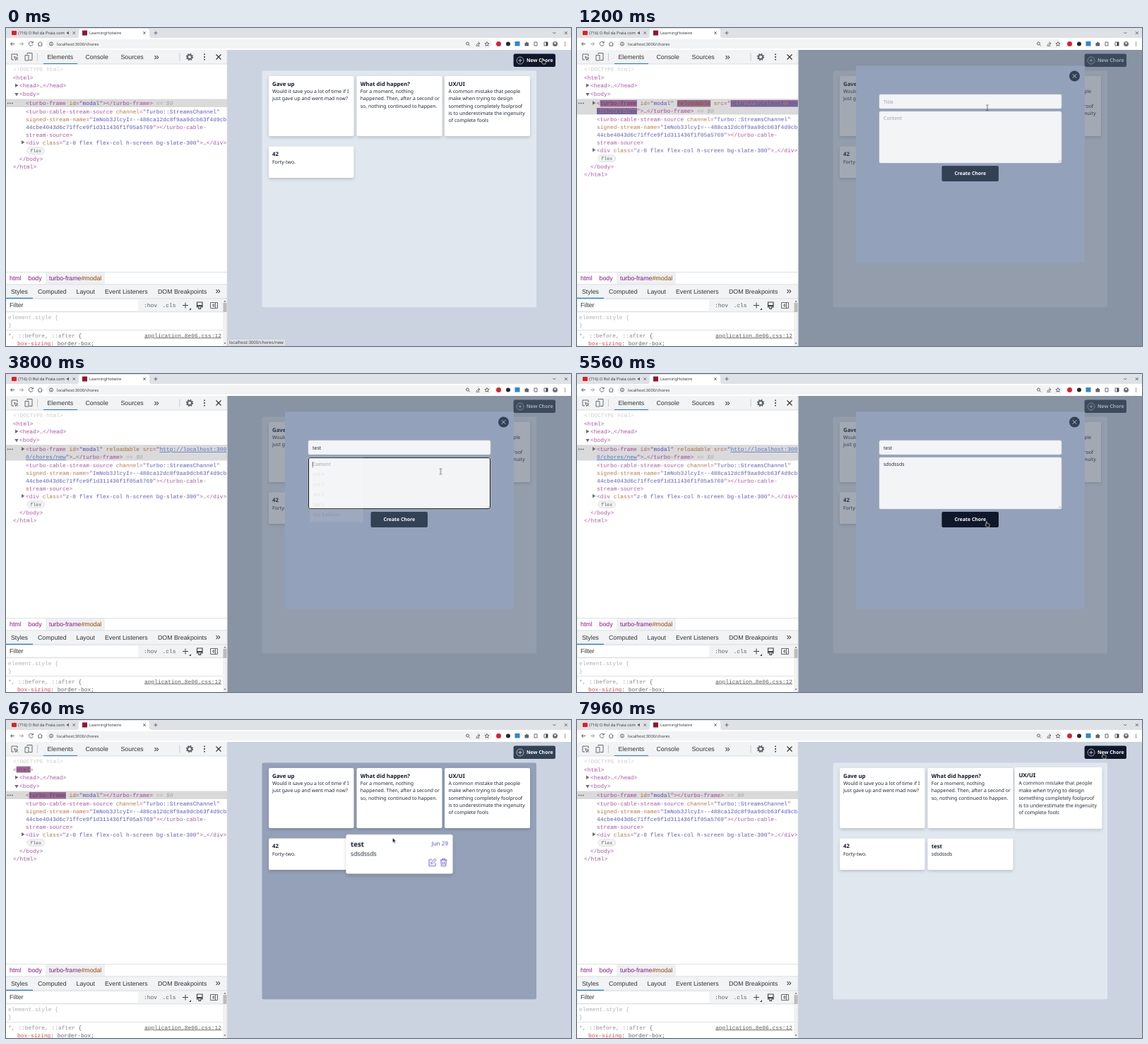
Recreate the animation shown at these times as an HTML page. Size 800 by 450 pixels, loop 8 s.

```html
<!DOCTYPE html>
<html lang="en">
<head>
<meta charset="utf-8">
<title>Chores</title>
<style>
html, body { margin: 0; width: 100%; height: 100%; overflow: hidden; background: #fff; }
svg { display: block; text-rendering: geometricPrecision; }
text { font-family: "Noto Sans", sans-serif; font-size: 6.95px; fill: #1e293b; }
.ui { font-family: "Liberation Sans", Arial, sans-serif; font-size: 8.8px; fill: #333; }
.mono text { font-family: "Liberation Mono", monospace; font-size: 7.9px; fill: #881280; white-space: pre; opacity: .72; }
.mono .a { fill: #994500; }
.mono .v { fill: #1a1aa6; }
.mono .v.link { fill: #1a4fc8; }
.mono .g { fill: #949494; }
.mono .k { fill: #222; }
.link { text-decoration: underline; }
.bar text { font-size: 5.75px; fill: #3c4043; }
.ic { fill: none; stroke: #5f6368; stroke-width: .95; }
.title { font-size: 7.8px; font-weight: 600; fill: #0f172a; }
.btn { font-size: 6.9px; font-weight: 600; fill: #fff; }
.hint { fill: #9ca3af; }
.menu text { font-size: 6.4px; fill: #222; }
.card rect { fill: #fff; filter: drop-shadow(0 2px 2px #0000002b); }
.field { fill: #f3f4f6; stroke: #d1d5db; stroke-width: .5; }
.ring { fill: none; stroke: #181818; stroke-width: 1; }

/* One loop is 8 s, so 1% is 80 ms. */
.anim { animation: 8s step-end infinite; }
.modal { animation-name: modal; }
.closed { animation-name: closed; }
.open { animation-name: open; }
.fold { animation-name: fold; }
.shift { animation-name: shift; }
.flash1 { animation-name: flash1; animation-timing-function: linear; }
.flash2 { animation-name: flash2; animation-timing-function: linear; }
.status { animation-name: status; }
.board { animation-name: board; }
.new { animation-name: new; }
.create { animation-name: create; }
.ring1 { animation-name: ring1; }
.ring2 { animation-name: ring2; }
.hint1 { animation-name: hint1; }
.hint2 { animation-name: hint2; }
.caret { animation-name: caret; }
.menu { animation-name: menu; transform-origin: 468px 163px; }
.added { animation-name: added; }
.grow { animation-timing-function: cubic-bezier(.4, 0, .2, 1); }
.grow.c2 { animation-name: grow2; transform-origin: 557px 110.5px; }
.grow.c3 { animation-name: grow3; transform-origin: 681.5px 110.5px; }
.grow.c5 { animation-name: grow5; transform-origin: 557px 189.8px; }
.tools { opacity: 0; }
.c2 .tools { animation-name: tools2; }
.c3 .tools { animation-name: tools3; }
.c5 .tools { animation-name: tools5; }
.pointer { animation-name: pointer; animation-timing-function: ease-in-out; }
.hand { animation-name: hand; }
.arrow { animation-name: arrow; }
.beam { animation-name: beam; }
.key { fill-opacity: 0; animation: key 8s var(--t) step-end infinite; }

@keyframes key { 0% { fill-opacity: 1 } 43.75%, 100% { fill-opacity: 0 } }
@keyframes modal { 0% { opacity: 0 } 9% { opacity: 1 } 72%, 100% { opacity: 0 } }
@keyframes open { 0% { opacity: 0 } 10% { opacity: 1 } 72%, 100% { opacity: 0 } }
@keyframes closed { 0% { opacity: 1 } 10% { opacity: 0 } 72%, 100% { opacity: 1 } }
@keyframes fold { 0% { opacity: 0 } 11.5% { opacity: 1 } 72%, 100% { opacity: 0 } }
@keyframes shift { 0% { transform: none } 10% { transform: translateY(10.8px) } 72%, 100% { transform: none } }
@keyframes flash1 { 0%, 9.99% { opacity: 0 } 10%, 12.5% { opacity: 1 } 15% { opacity: .87 } 28%, 100% { opacity: 0 } }
@keyframes flash2 { 0%, 80.99% { opacity: 0 } 81%, 82% { opacity: 1 } 84.5% { opacity: .87 } 93.5%, 100% { opacity: 0 } }
@keyframes status { 0% { opacity: 1 } 12%, 100% { opacity: 0 } }
@keyframes board { 0% { fill: #e0e7ef } 72% { fill: #94a1b8 } 98.5%, 100% { fill: #e0e7ef } }
@keyframes new { 0% { fill: #0f172a } 9% { fill: #334155 } 98.5%, 100% { fill: #0f172a } }
@keyframes create { 0% { fill: #334155 } 67.25%, 100% { fill: #0f172a } }
@keyframes ring1 { 0% { opacity: 0 } 21.25% { opacity: 1 } 46.25%, 100% { opacity: 0 } }
@keyframes ring2 { 0% { opacity: 0 } 46.25% { opacity: 1 } 68.5%, 100% { opacity: 0 } }
@keyframes hint1 { 0% { opacity: 1 } 28.75%, 100% { opacity: 0 } }
@keyframes hint2 { 0% { opacity: 1 } 52.5%, 100% { opacity: 0 } }
@keyframes caret {
  0% { opacity: 0 }
  21.25% { opacity: 1; transform: none }
  28.75% { transform: translate(2.5px, 0) }
  32.5% { transform: translate(6.4px, 0) }
  35.5% { transform: translate(9.8px, 0) }
  38.5% { transform: translate(12.3px, 0) }
  46.25% { transform: translate(0, 23.5px) }
  52.5% { transform: translate(3.3px, 23.5px) }
  53.75% { transform: translate(7.6px, 23.5px) }
  55% { transform: translate(10.9px, 23.5px) }
  56.25% { transform: translate(15.2px, 23.5px) }
  57.5% { transform: translate(18.5px, 23.5px) }
  58.75% { transform: translate(21.9px, 23.5px) }
  60% { transform: translate(26.1px, 23.5px) }
  61.25% { opacity: 1; transform: translate(29.5px, 23.5px) }
  68.5%, 100% { opacity: 0 }
}
@keyframes menu {
  0% { opacity: 0 }
  30% { opacity: 1; transform: none }
  46.25% { opacity: 1; transform: none; animation-timing-function: linear }
  47.5% { opacity: .1; transform: scale(.95); animation-timing-function: linear }
  48%, 100% { opacity: 0; transform: scale(.95) }
}
@keyframes added { 0% { opacity: 0 } 73%, 100% { opacity: 1 } }
@keyframes grow5 { 0%, 73.25% { transform: none } 75.25%, 87.5% { transform: scale(1.25) } 89.4%, 100% { transform: none } }
@keyframes grow2 { 0%, 88.75% { transform: none } 90.6%, 92.9% { transform: scale(1.25) } 94.8%, 100% { transform: none } }
@keyframes grow3 { 0%, 92.9% { transform: none } 94.8%, 98.6% { transform: scale(1.25) } 100% { transform: none } }
@keyframes tools5 { 0% { opacity: 0 } 73.25% { opacity: 1 } 87.5%, 100% { opacity: 0 } }
@keyframes tools2 { 0% { opacity: 0 } 88.75% { opacity: 1 } 92.9%, 100% { opacity: 0 } }
@keyframes tools3 { 0% { opacity: 0 } 92.9% { opacity: 1 } 98.5%, 100% { opacity: 0 } }
@keyframes pointer {
  0%, 11% { transform: translate(760px, 43px) }
  14.4%, 18.75% { transform: translate(581px, 113px) }
  21.25%, 41.5% { transform: translate(579px, 110px) }
  45.5%, 62.5% { transform: translate(615.5px, 138px) }
  67.5%, 72.5% { transform: translate(580px, 208.5px) }
  82.5% { transform: translate(547.5px, 166.8px) }
  85.5% { transform: translate(547.5px, 166.8px); animation-timing-function: cubic-bezier(.4, 0, .8, .8) }
  98.5% { transform: translate(741px, 54px); animation-timing-function: linear }
  99.5%, 100% { transform: translate(745px, 46.5px) }
}
@keyframes hand { 0% { opacity: 1 } 9% { opacity: 0 } 67.25% { opacity: 1 } 72% { opacity: 0 } 98.5%, 100% { opacity: 1 } }
@keyframes arrow { 0% { opacity: 0 } 9% { opacity: 1 } 14% { opacity: 0 } 72% { opacity: 1 } 98.5%, 100% { opacity: 0 } }
@keyframes beam { 0% { opacity: 0 } 14% { opacity: 1 } 67.25%, 100% { opacity: 0 } }
</style>
</head>
<body>
<svg width="800" height="450" viewBox="0 0 800 450">
<defs>
  <g id="date"><text text-anchor="end" style="font-size:6.4px;fill:#5146d0">Jun 29</text></g>
  <g id="edit" fill="none" stroke="#5b50d6" stroke-width=".75" stroke-linejoin="round">
    <path d="M0-3.2h-3.6v7.2h7.2V.5M-1.4 1.6l.3-1.8L3-4.2l1.4 1.4L.4 1.3z"/>
    <path d="M9-2.8h7.6M11.3-2.8v-1.3h3v1.3M9.8-2.8l.5 6.8h5l.5-6.8M11.8-1v3.4M13.8-1v3.4"/>
  </g>
</defs>

<!-- Browser bar -->
<g class="bar">
  <rect width="800" height="14" fill="#dee1e6"/>
  <path d="M100 14q3 0 3-3V4q0-3 3-3h94q3 0 3 3v7q0 3 3 3z" fill="#fff"/>
  <rect x="8" y="4" width="7" height="6" rx="1" fill="#e02020"/>
  <text x="17" y="9.2">(716) O Rol da Praia com</text>
  <path class="ic" d="M94.5 5.2l3.6 3.6m0-3.6l-3.6 3.6M194.2 5.2l3.6 3.6m0-3.6l-3.6 3.6M209.5 7h5M212 4.5v5M774.3 6l2 2 2-2M790.8 5l4 4m0-4l-4 4"/>
  <path d="M86 6h1.3l1.7-1.5v5L87.3 8H86z" fill="#5f6368"/>
  <rect x="108" y="3.5" width="7" height="7" fill="#94152f"/>
  <text x="118" y="9.2">LearningHotwire</text>

  <rect y="14" width="800" height="17" fill="#fff"/>
  <rect x="57" y="16" width="631" height="13" rx="6.5" fill="#f1f3f4"/>
  <path class="ic" d="M12 22.5H6.5m2.5-2.5l-2.5 2.5 2.5 2.5M38 20.8a3 3 0 1 0 .2 2.4M38.3 18.8v2.3H36M45 22.5l3.3-3 3.3 3M46 22v3.3h4.6V22"/>
  <path class="ic" d="M19 22.5h5.5m-2.5-2.5l2.5 2.5-2.5 2.5" opacity=".6"/>
  <circle class="ic" cx="64" cy="22.5" r="2.5"/><path class="ic" d="M64 22v2M64 20.7v.7"/>
  <text x="72" y="24.7">localhost:3000/chores</text>
  <g class="ic">
    <circle cx="653.5" cy="22" r="2"/><path d="M655 23.5l2 2M668.5 19.5l2.5 2.3-2.5 2.3M670.5 21.8q-4 0-4.5 2.5M665.5 25.3h5"/>
    <path d="M681 19.5l.9 2 2.2.2-1.7 1.4.5 2.2-1.9-1.1-1.9 1.1.5-2.2-1.7-1.4 2.2-.2z"/>
    <path d="M748 20h4v5h-4zM762 20h5v5h-5z"/>
  </g>
  <circle cx="697.5" cy="22.5" r="3.5" fill="#d92332"/>
  <circle cx="711" cy="22.5" r="3" fill="#26282b"/>
  <rect x="720.5" y="19" width="7" height="6.5" fill="#2f86d6"/>
  <path d="M734.5 21h1.7q0-1.6 1.2-1.6t1.2 1.6h1.5v4.5h-5.6z" fill="#5f6368"/>
  <path d="M764.5 20h2.5v5h-2.5z" fill="#3c4043"/>
  <circle cx="777.5" cy="22.5" r="3.5" fill="#6b7075"/><circle cx="777.5" cy="21.5" r="1.2" fill="#fff"/>
  <path d="M791.5 19.8v1.2m0 1v1.2m0 1v1.2" stroke="#5f6368" stroke-width="1.2"/>
</g>

<!-- Developer tools -->
<rect y="31" width="313" height="419" fill="#fff"/>
<rect y="31" width="313" height="20" fill="#f1f3f4"/>
<path d="M0 51h313M0 345.5h313" stroke="#cacdd1" stroke-width=".6"/>
<path d="M53 50.5h48" stroke="#1a73e8" stroke-width="1.2"/>
<g class="ic">
  <path d="M11 45H8v-8h8v3M11.5 40.5l5.5 2-2.3.9-.9 2.3zM14.8 43.4l2.2 2.3"/>
  <path d="M30 37v-1.5h7v10h-4M27 38.5h5v7.5h-5z"/><path d="M44.5 35.5v11M246 35.5v11" stroke="#c4c7ca"/>
  <circle cx="260" cy="41" r="3" stroke-width="2"/><circle cx="260" cy="41" r="4.5" stroke-width="1.4" stroke-dasharray="1.77"/>
  <path d="M297.5 37.5l7 7m0-7l-7 7" stroke="#333" stroke-width="1.2"/>
</g>
<path d="M281 36.5v1.8m0 1.8v1.8m0 1.8v1.8" stroke="#444" stroke-width="1.7"/>
<text class="ui" x="58.5" y="44">Elements</text><text class="ui" x="112.5" y="44">Console</text>
<text class="ui" x="162.5" y="44">Sources</text><text class="ui" x="209.5" y="44.5" style="font-size:13px">»</text>

<g class="mono">
  <rect y="100.5" width="313" height="11.5" fill="#dadada"/>
  <rect class="anim open" y="100.5" width="313" height="22" fill="#dadada"/>
  <g fill="#875a82">
    <path class="anim flash1" d="M32.7 102h52.2v9.5H32.7zM141.8 102h47.4v9.5h-47.4zM217.6 102H313v9.5h-95.4zM28 113h57v9H28z"/>
    <path class="anim flash2" d="M14.7 65.5h20v9h-20zM32.7 102h52.2v9.5H32.7z"/>
  </g>
  <path d="M2 106.5h1.5m1.5 0h1.5m1.5 0h1.5" stroke="#555" stroke-width="1.4"/>
  <path d="M13 78.5l4.5 2.7-4.5 2.7zM12.3 92h5.4L15 96.5z" fill="#6e6e6e"/>
  <text x="10" y="61" style="fill:#bbb">&lt;!DOCTYPE html&gt;</text>
  <text x="10" y="72.6">&lt;html&gt;</text>
  <text x="19" y="84">&lt;head&gt;<tspan class="k">…</tspan>&lt;/head&gt;</text>
  <text x="19" y="96.4">&lt;body&gt;</text>
  <g class="anim closed">
    <text x="28" y="109">&lt;turbo-frame <tspan class="a">id</tspan>="<tspan class="v">modal</tspan>"&gt;&lt;/turbo-frame&gt;<tspan class="g" font-style="italic"> == $0</tspan></text>
  </g>
  <g class="anim open">
    <path class="anim fold" d="M22 103.3l4.5 2.7-4.5 2.7z" fill="#6e6e6e"/>
    <text x="28" y="109">&lt;turbo-frame <tspan class="a">id</tspan>="<tspan class="v">modal</tspan>" <tspan class="a">reloadable</tspan> <tspan class="a">src</tspan>="<tspan class="v link">http://localhost:300</tspan></text>
    <text x="28" y="120.2"><tspan class="v link">0/chores/new</tspan>"&gt;<tspan class="k">…</tspan>&lt;/turbo-frame&gt;<tspan class="g" font-style="italic"> == $0</tspan></text>
  </g>
  <g class="anim shift">
    <text x="28" y="120.6">&lt;turbo-cable-stream-source <tspan class="a">channel</tspan>="<tspan class="v">Turbo::StreamsChannel</tspan>"</text>
    <text x="28" y="131.6"><tspan class="a">signed-stream-name</tspan>="<tspan class="v">ImNob3JlcyI=--488ca12dc8f9aa9dcb63f4d9cb</tspan></text>
    <text x="28" y="142.6"><tspan class="v">44cbe4043d6c71ffce9f1d311436f1f05a5769</tspan>"&gt;&lt;/turbo-cable-</text>
    <text x="28" y="153.5">stream-source&gt;</text>
    <path d="M22 159l4.5 2.7-4.5 2.7z" fill="#6e6e6e"/>
    <text x="28" y="164.7">&lt;div <tspan class="a">class</tspan>="<tspan class="v">z-0 flex flex-col h-screen bg-slate-300</tspan>"&gt;<tspan class="k">…</tspan>&lt;/div&gt;</text>
    <rect x="30" y="169" width="24.5" height="9.5" rx="4.7" fill="#f1f3f4" stroke="#cacdd1" stroke-width=".6"/>
    <text class="k" x="42.2" y="175.8" text-anchor="middle" style="font-size:6.6px">flex</text>
    <text x="19" y="187.5">&lt;/body&gt;</text>
    <text x="10" y="199">&lt;/html&gt;</text>
  </g>
</g>

<rect x="56" y="346" width="84" height="16.5" fill="#eef0f2"/>
<text class="ui" x="5" y="357" style="fill:#881280">html</text>
<text class="ui" x="31.5" y="357" style="fill:#881280">body</text>
<text class="ui" x="61" y="357" style="fill:#881280">turbo-frame<tspan fill="#994500">#modal</tspan></text>
<rect y="363" width="313" height="39" fill="#f1f3f4"/>
<path d="M0 362.8h313M0 382.8h313M0 401.8h307M0 427.5h307" stroke="#cacdd1" stroke-width=".6"/>
<path d="M0 382.3h38" stroke="#1a73e8" stroke-width="1.2"/>
<text class="ui" x="7" y="375.5">Styles</text><text class="ui" x="45" y="375.5">Computed</text>
<text class="ui" x="99.5" y="375.5">Layout</text><text class="ui" x="140" y="375.5">Event Listeners</text>
<text class="ui" x="215" y="375.5">DOM Breakpoints</text><text class="ui" x="296.5" y="376" style="font-size:13px">»</text>
<rect x="1" y="384.5" width="186" height="15.5" fill="#fff"/>
<text class="ui" x="5" y="395.3">Filter</text>
<g class="mono">
  <text class="k" x="195" y="395">:hov</text><text class="k" x="221.5" y="395">.cls</text>
  <text class="g" x="3" y="411.5">element.style {</text><text class="g" x="3" y="423">}</text>
  <text class="k" x="3" y="437.5"><tspan fill="#666">*, ::before, ::after</tspan> {</text>
  <text class="k link" x="196" y="437.5">application…8e06.css:12</text>
  <text class="k" x="16" y="449"><tspan fill="#c80000">box-sizing</tspan>: border-box;</text>
</g>
<path d="M250 392.5h8m-4-4v8" stroke="#444"/><path d="M262 396v3h-3z" fill="#444"/>
<path d="M270.5 388h7.5v4.5h-7.5zM270.5 393.5h7.5v1.5h-2.5v2.5H273V395h-2.5z" fill="none" stroke="#444" stroke-width="1.2"/>
<path d="M289.5 388.5h10v8h-10zM296.5 388.5v8M294.5 390.5l-2.5 2 2.5 2z" class="ic"/>
<rect x="307" y="384" width="6" height="66" fill="#f1f1f1"/>
<rect x="307.5" y="389" width="5" height="13" fill="#bcbcbc"/>
<path d="M308.5 387.5l1.5-1.8 1.5 1.8zM308.5 445.5l1.5 1.8 1.5-1.8z" fill="#555"/>
<path d="M313.3 31v419" stroke="#b5b9be" stroke-width=".7"/>

<!-- Page -->
<rect x="313.7" y="31" width="486.3" height="419" fill="#cbd3e0"/>
<rect class="anim new" x="718.6" y="36.5" width="59.4" height="18.6" rx="2.5"/>
<circle cx="728" cy="46" r="5" fill="none" stroke="#fff" stroke-width=".6"/>
<path d="M725.3 46h5.4M728 43.3v5.4" stroke="#fff" stroke-width=".7"/>
<text class="btn" x="737" y="48.3">New Chore</text>
<rect class="anim board" x="362.5" y="60.6" width="388.5" height="334.6" rx="2.5"/>

<g class="card">
  <rect x="372" y="68" width="120.5" height="85" rx="2"/>
  <text class="title" x="377" y="81.8">Gave up</text>
  <text x="377" y="92">Would it save you a lot of time if I</text><text x="377" y="102.3">just gave up and went mad now?</text>
</g>
<g class="card anim grow c2">
  <rect x="496.5" y="68" width="121" height="85" rx="2"/>
  <text class="title" x="501.8" y="81.8">What did happen?</text>
  <text x="501.8" y="92">For a moment, nothing</text><text x="501.8" y="102.3">happened. Then, after a second or</text>
  <text x="501.8" y="112.6">so, nothing continued to happen.</text>
  <g class="anim tools"><use href="#date" x="612.2" y="80"/><use href="#edit" x="594.3" y="140.2"/></g>
</g>
<g class="card anim grow c3">
  <rect x="621" y="68" width="121" height="85" rx="2"/>
  <text class="title" x="626.5" y="81.8">UX/UI</text>
  <text x="626.5" y="92">A common mistake that people</text><text x="626.5" y="102.3">make when trying to design</text>
  <text x="626.5" y="112.6">something completely foolproof</text><text x="626.5" y="122.9">is to underestimate the ingenuity</text>
  <text x="626.5" y="133.1">of complete fools</text>
  <g class="anim tools"><use href="#date" x="737" y="80"/><use href="#edit" x="719" y="140.2"/></g>
</g>
<g class="card">
  <rect x="372" y="167.5" width="120.5" height="44.5" rx="2"/>
  <text class="title" x="377" y="181.3">42</text><text x="377" y="191.5">Forty-two.</text>
</g>
<g class="anim added"><g class="card anim grow c5">
  <rect x="496.5" y="167.5" width="121" height="44.5" rx="2"/>
  <text class="title" x="501.8" y="181.3">test</text><text x="501.8" y="191.5">sdsdssds</text>
  <g class="anim tools"><use href="#date" x="612.2" y="179.8"/><use href="#edit" x="594.3" y="199.2"/></g>
</g></g>

<!-- Dialog -->
<g class="anim modal">
  <rect x="313.7" y="31" width="486.3" height="419" fill="#475569" opacity=".5"/>
  <rect x="395" y="53.5" width="324" height="279" fill="#94a1ba"/>
  <circle cx="704.5" cy="68" r="7.5" fill="#334155"/>
  <path d="M701.7 65.2l5.6 5.6m0-5.6l-5.6 5.6" stroke="#e2e8f0" stroke-width=".8"/>
  <rect class="field" x="428" y="94" width="258" height="20" rx="2"/>
  <rect class="field" x="428" y="118" width="258" height="73" rx="2"/>
  <path d="M682 189.5l2.5-2.5M683.5 189.7l1.2-1.2" stroke="#777" stroke-width=".5"/>
  <text class="hint anim hint1" x="434" y="106.5">Title</text>
  <text class="hint anim hint2" x="434" y="130">Content</text>
  <text x="434" y="106.5"><tspan class="key" style="--t:2.3s">t</tspan><tspan class="key" style="--t:2.6s">e</tspan><tspan class="key" style="--t:2.84s">s</tspan><tspan class="key" style="--t:3.08s">t</tspan></text>
  <text x="434" y="130"><tspan class="key" style="--t:4.2s">s</tspan><tspan class="key" style="--t:4.3s">d</tspan><tspan class="key" style="--t:4.4s">s</tspan><tspan class="key" style="--t:4.5s">d</tspan><tspan class="key" style="--t:4.6s">s</tspan><tspan class="key" style="--t:4.7s">s</tspan><tspan class="key" style="--t:4.8s">d</tspan><tspan class="key" style="--t:4.9s">s</tspan></text>
  <rect class="ring anim ring1" x="428.5" y="94.5" width="257" height="19" rx="2"/>
  <rect class="ring anim ring2" x="428.5" y="118.6" width="257" height="72" rx="2"/>
  <rect class="anim caret" x="433.8" y="100" width=".6" height="8.5" fill="#111"/>
  <rect class="anim create" x="516.5" y="195" width="80.5" height="22" rx="2"/>
  <text class="btn" x="556.8" y="208.4" text-anchor="middle">Create Chore</text>
  <g class="anim menu">
    <rect x="428" y="114.5" width="80" height="97" fill="#fff" stroke="#c8ccd2" stroke-width=".5"/>
    <text x="433" y="127.8">test</text><text x="433" y="142.8">test 4</text><text x="433" y="157.8">test 2</text>
    <text x="433" y="172.8">test 3</text><text x="433" y="187.8">test 5</text><text x="433" y="202.8">test 4 editado</text>
  </g>
</g>

<g class="anim status">
  <path d="M313.7 450v-10H394q2 0 2 2v8z" fill="#dee1e6" stroke="#b8bcc2" stroke-width=".5"/>
  <text x="316" y="447.3" style="font-size:6.1px;fill:#3c4043">localhost:3000/chores/new</text>
</g>

<g class="anim pointer">
  <path class="anim hand" d="M-.7.6Q0-.4.7.6V3l3 .8q.8.3.6 1.2L3.8 8H.2L-2.2 4.8q.3-1 1.5 0z" fill="#111" stroke="#fff" stroke-width=".6"/>
  <path class="anim arrow" d="M0 0v6.7l1.6-1.4 1.2 2.5 1.1-.5-1.2-2.5h2.1z" fill="#111" stroke="#fff" stroke-width=".5"/>
  <path class="anim beam" d="M-1.7-4H-.5L0-3.5.5-4h1.2M-1.7 4H-.5L0 3.5.5 4h1.2M0-3.5v7" fill="none" stroke="#444" stroke-width=".7"/>
</g>
</svg>
</body>
</html>
```
